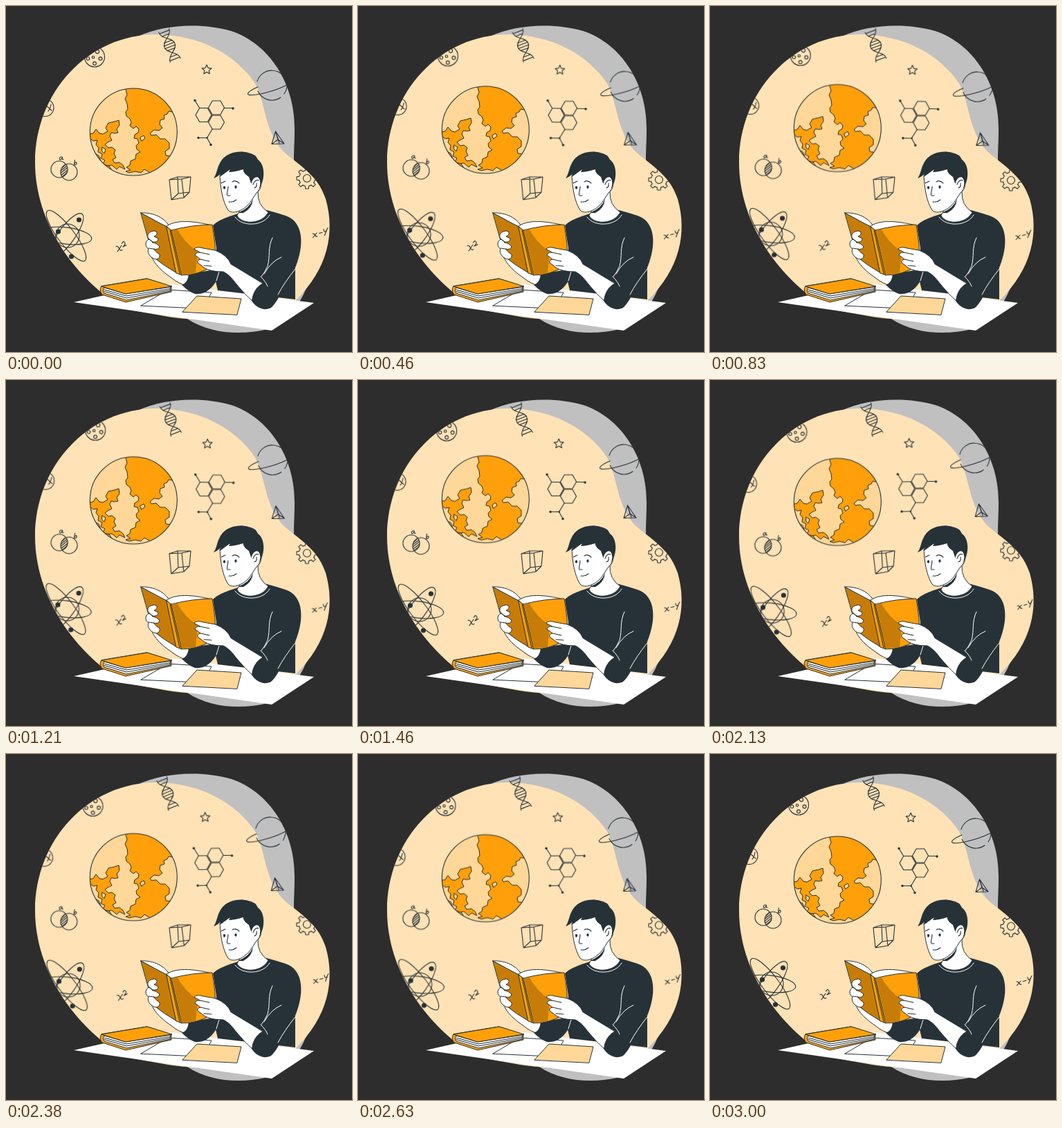
These frames come from a looping animation (500 px wide and 500 px high, 3040 ms). An HTML page:

```html
<!DOCTYPE html>
<html lang="en">
<head>
<meta charset="utf-8">
<title>Reading about science</title>
<style>
  html, body { margin: 0; width: 100%; height: 100%; overflow: hidden; background: #2d2d2d; }
  svg { display: block; width: 100vw; height: 100vh; }
  .line { fill: none; stroke: #263238; stroke-width: 1.1; stroke-linecap: round; stroke-linejoin: round; }
  .ink { fill: #263238; }
  .orange { fill: #ff9f0a; }
  .tan { fill: #ffd798; }
  .brown { fill: #c77c08; }
  .white { fill: #fff; }
  .edge { stroke: #263238; stroke-width: 1; stroke-linecap: round; stroke-linejoin: round; }
  .fold { fill: none; stroke: #fff; stroke-width: 1; stroke-linecap: round; }
  #icons { transform-origin: 250px 250px; animation: sway 3040ms linear infinite; }
  #globe { animation: float 3040ms linear infinite; }
  @keyframes sway {
    0%, 98.68%, 100% { transform: rotate(0deg); }
    24.67% { transform: rotate(1deg); }
    74.01% { transform: rotate(-1deg); }
  }
  @keyframes float {
    0%, 98.68%, 100% { transform: translateY(0); }
    49.34% { transform: translateY(-10px); }
  }
</style>
</head>
<body>
<svg viewBox="0 0 500 500">
  <defs>
    <path id="shade" d="M190 44C230 26 283 24 325 36C380 54 418 112 417 178C417 196 416 207 416 222L440 330C442 360 440 400 432 412C420 440 400 458 378 467C340 476 295 474 262 452L180 250Z"/>
    <path id="blob" d="M42 226C42 125 118 41 218 41C282 42 334 72 360 112C376 140 373 186 405 214C430 234 452 248 462 279C476 328 465 380 419 425L290 452C265 456 215 446 170 437C100 394 42 314 42 226Z"/>
    <clipPath id="backs"><use href="#shade"/><use href="#blob"/></clipPath>
    <clipPath id="disc"><circle cx="184.3" cy="182" r="63"/></clipPath>
    <path id="hex" d="M-11.5 0L-5.8-10H5.8L11.5 0 5.8 10H-5.8Z"/>
    <path id="tooth" d="M-2.6-11.5L-2.2-15H2.2L2.6-11.5"/>
  </defs>

  <use href="#shade" fill="#c0c0c0"/>
  <use href="#blob" fill="#ffe2b6"/>

  <g clip-path="url(#backs)">
  <g id="icons" class="line">
    <g id="moon">
      <circle cx="128" cy="73.500" r="14.500"/>
      <circle cx="126" cy="74" r="1.700"/><circle cx="118.500" cy="76" r="2.200"/>
      <circle cx="136.500" cy="76" r="2.400"/><circle cx="128" cy="83" r="2.400"/>
      <circle cx="132" cy="66" r="2.600"/><circle cx="121" cy="67" r="1.500"/>
    </g>
    <g id="helix" transform="translate(236.500 57) rotate(-21)">
      <path d="M-8-23C-8-12 8-10 8 0S-8 12-8 23M8-23C8-12-8-10-8 0S8 12 8 23"/>
      <path d="M-7-21H7M-5-16H5M-6-6H6M-8-2H8M-8 2H8M-6 6H6M-5 16H5M-7 21H7"/>
    </g>
    <path id="star" d="M290 85L292.100 89.600 297 90.100 293.300 93.400 294.400 98 290 95.600 285.800 98 286.800 93.400 283.200 90.100 288 89.600Z"/>
    <g id="planet">
      <path d="M363 109A22 22 0 0 1 405.500 110M406 114A22 22 0 0 1 402 127M397 132A22 22 0 0 1 364 123"/>
      <path d="M364 117C352 122 348 126 350 128C356 131 386 124 404 115C416 109 420 104 414 103.500Q411 103.500 406 105"/>
    </g>
    <g id="molecule">
      <use href="#hex" x="304" y="147"/><use href="#hex" x="285.500" y="157.500"/><use href="#hex" x="304" y="168"/>
      <path d="M279.700 147.500L273 136.500M315.500 147.500H328M298 178L290.500 190.500H278M290.500 190.500L296 200.500"/>
      <g class="ink"><circle cx="273" cy="136.500" r="1.200"/><circle cx="328" cy="148" r="1.200"/><circle cx="278" cy="190.500" r="1.200"/><circle cx="296" cy="200.500" r="1.200"/><circle cx="290.500" cy="190.500" r=".7"/></g>
    </g>
    <path id="pyramid" d="M389.500 181L384 199.500 402 199 389.500 181 393 193 384 199.500M393 193L402 199M389.500 181L395 198"/>
    <g id="gear" transform="translate(435 249)">
      <circle r="5.500"/><circle r="11.500" stroke-dasharray="3.800 5.230" stroke-dashoffset="-2.600"/>
      <use href="#tooth"/><use href="#tooth" transform="rotate(45)"/><use href="#tooth" transform="rotate(90)"/><use href="#tooth" transform="rotate(135)"/>
      <use href="#tooth" transform="rotate(180)"/><use href="#tooth" transform="rotate(225)"/><use href="#tooth" transform="rotate(270)"/><use href="#tooth" transform="rotate(315)"/>
    </g>
    <path id="cube" d="M236 251L254 250 257 277 239 280ZM248 247L267 247 265 269 249 271ZM236 251L248 247M254 250L267 247M257 277L265 269M239 280L249 271"/>
    <g id="sets">
      <circle cx="77" cy="236" r="12"/><circle cx="91" cy="240" r="12"/>
      <path d="M80.500 234.500L86 229M79.500 238L88 231M79.300 241.300L88.800 233.500M80.300 244L89 237M82 246L88.500 240.500"/>
      <path d="M81.500 218.500C79 217 76.500 219.500 77.500 221.500S80.500 221 81.500 218.500Q80.500 222.500 83 221.500M99.500 222.500L98.500 229C101 230.500 102.800 228 102 226.500S99 226.500 98.700 228.500"/>
    </g>
    <path id="sign" d="M69 147A12.500 12.500 0 1 1 44 147A12.500 12.500 0 1 1 69 147M55 141L66 151M61 152Q64 149 65 142"/>
    <g id="atom" transform="translate(87 332)">
      <circle cx="2" cy="0" r="17"/>
      <ellipse rx="37" ry="12" transform="rotate(7)"/>
      <ellipse rx="45" ry="12" transform="rotate(53)"/>
      <ellipse rx="39" ry="12" transform="rotate(-54)"/>
      <g class="ink"><circle cx="18.500" cy="-23" r="3"/><circle cx="-11.500" cy="-6" r="3"/><circle cx="7.500" cy="30" r="3"/></g>
    </g>
    <path id="square" d="M159 347.500Q162 346.500 163.500 350.500T168 352.500M167 346L161 355M167.500 343Q169.500 339 171.500 341.500T169 348L174 345.500"/>
    <path id="difference" d="M443 329Q446 329 446.500 331T450 333M449 328L443.500 334.500M452.500 328.500L457 327.200M459 322.500Q459.500 327 462 326L465 320.500M463.500 323.500L460.500 331.500"/>
  </g>
  </g>

  <g id="globe">
    <circle class="tan" cx="184.300" cy="182" r="63"/>
    <g clip-path="url(#disc)" class="orange edge">
      <path d="M172 112L173 121 175 128 172 134 175 141 176 149 173 153 174 159 179 163 181 168 179 173 184 177 188 174 192 178 191 183 186 186 185 191 190 192 192 198 188 202 189 207 194 211 188 214 187 221 180 224 179 230 174 233 180 237 173 239 178 241 187 239 195 241 200 236 207 240 215 248 250 235 238 217 231 216 230 210 236 206 236 198 230 192 223 192 217 186 210 187 208 184 214 179 221 180 226 176 222 171 223 165 229 163 228 158 233 156 235 152 245 154 240 110Z"/>
      <path d="M115 186L126 184 130 178 135 184 140 185 147 181 144 176 148 169 157 167 163 165 164 172 160 178 162 183 157 184 152 183 150 188 153 194 147 197 143 200 148 205 153 204 158 208 156 213 159 219 154 222 157 227 164 226 169 230 172 236 164 232 160 236 153 230 147 231 140 228 143 223 137 220 139 214 133 211 134 205 130 200 132 194 126 195 121 191 115 196Z"/>
      <path d="M128 213L134 216 137 224 142 230 149 231 153 237 147 240 125 225Z"/>
      <path class="tan" d="M194 190L199 187 201 191 196 195Z"/>
      <path class="tan" d="M139 204L144 207 142 213 139 210Z"/>
    </g>
    <circle cx="184.300" cy="182" r="63" class="line"/>
  </g>

  <g id="desk">
    <path class="white" d="M98 428L222 400 445 429 384 469Z"/>
    <path class="white edge" d="M195 433L234 410 297 414 285 437Z"/>
    <path class="tan edge" d="M255 442L276 419 340 423 334 446Z"/>
  </g>

  <g id="closed-book">
    <path class="orange edge" d="M138 405C135 408 136 414 139 417L173 428 239 413 239 406 204 394Z"/>
    <path class="white edge" d="M142 407L173 416 238 406Q236 409 238 412L174 425 142 415Q139 411 142 407Z"/>
    <path class="line" stroke-width=".7" d="M142 410L174 419 237 408.500M142 412.500L174 422 237 410.500"/>
    <path class="orange edge" d="M138 405L204 394 240 405 173 416Z"/>
  </g>

  <g id="torso">
    <path class="ink" d="M335 300C319 305 306 310 299 317L304 350 300 385 306 411 418 424V378C431 347 431 312 404 303Q392 299 377 295Z"/>
    <path class="white edge" d="M207 350C209 368 222 381 238 392Q250 402 264 405L276 390C258 387 248 381 236 366Z"/>
    <path class="ink" d="M254 403Q263 400 264 387L308 380 306 393C299 409 286 418 273 416Q264 413 254 403Z"/>
    <path class="fold" d="M308 384L304 397"/>
  </g>

  <g id="head">
    <path class="white edge" d="M345 285L364 268Q363 288 379 298C371 315 341 317 334 303Z"/>
    <path class="fold" d="M331 305C342 320 372 318 381 302"/>
    <path class="ink" d="M335 299Q352 292 357 279Q356 292 343 299Z"/>
    <path class="white edge" d="M309 240C309 260 313 283 321 295C327 302 345 296 354 282L362 270C372 263 370 247 361 246L350 230Z"/>
    <path class="ink" d="M300 249C306 241 304 232 313 221C321 212 337 208 350 212Q361 214 364 222C374 229 374 247 369 258Q366 267 361 270L354 256 351 247Q342 241 343 236Q330 240 322 240L324 236Q313 244 309 247L310 242Q306 247 300 249Z"/>
    <ellipse class="white" cx="360.500" cy="259" rx="6.500" ry="12" transform="rotate(12 360.500 259)"/>
    <path class="line" d="M311 256L317 253M327 254Q332 251 337 256M321 261C321 268 318 271 320 274L324 274M322 283Q328 284 333 280M357 258Q360 250 365 252M359 263Q363 262 362 256"/>
    <ellipse class="ink" cx="315.500" cy="262.500" rx="1.600" ry="2.200"/><ellipse class="ink" cx="332" cy="261.500" rx="1.600" ry="2.200"/>
  </g>

  <g id="open-book">
    <path class="brown edge" d="M195 299L233 319 247 386Q229 376 213 363Z"/>
    <path class="white edge" d="M195 299C213 298 231 306 238 322Q217 311 195 299Z"/>
    <path class="white edge" d="M232 318C249 307 275 312 298 317L239 325Z"/>
    <path class="orange edge" d="M232 319L239 324 254 389 246 386Z"/>
    <path class="orange edge" d="M239 324Q270 316 298 316Q303 342 303 374Q276 390 254 389Z"/>
    <path class="brown" d="M240 325L248 323Q256 340 277 355L274 386 254 388.500Z"/>
    <path class="line" d="M237 324L251 387"/>
  </g>

  <g id="hands">
    <path class="white edge" d="M214 325C204 326 203 333 207 337C200 340 201 348 206 351C203 357 210 366 218 366Q223 364 222 359Q217 356 213 351Q221 353 222 347Q218 343 211 341Q220 342 220 336L214 333Q219 331 218 327Z"/>
    <path class="line" d="M207 337L213 342M206 350L213 351"/>
    <path class="white edge" d="M272 351Q275 347 285 350L302 353Q320 360 325 373L373 402 360 430Q345 417 333 402Q323 388 314 384Q295 384 286 378L277 371Q276 367 281 366L273 360Q274 356 280 356Z"/>
    <path class="line" d="M280 356L294 359M281 366L294 369M286 375L297 376"/>
    <path class="ink" d="M384 380L368 391Q374 400 367 403Q356 412 355 426C362 437 374 441 383 436C394 427 400 405 418 383V362L396 350Z"/>
    <path class="fold" d="M385 335C378 349 382 362 378 376Q374 385 369 391M398 363Q383 369 373 387M418 380Q402 400 393 417M368 391Q376 399 378 405"/>
  </g>
</svg>
</body>
</html>
```
